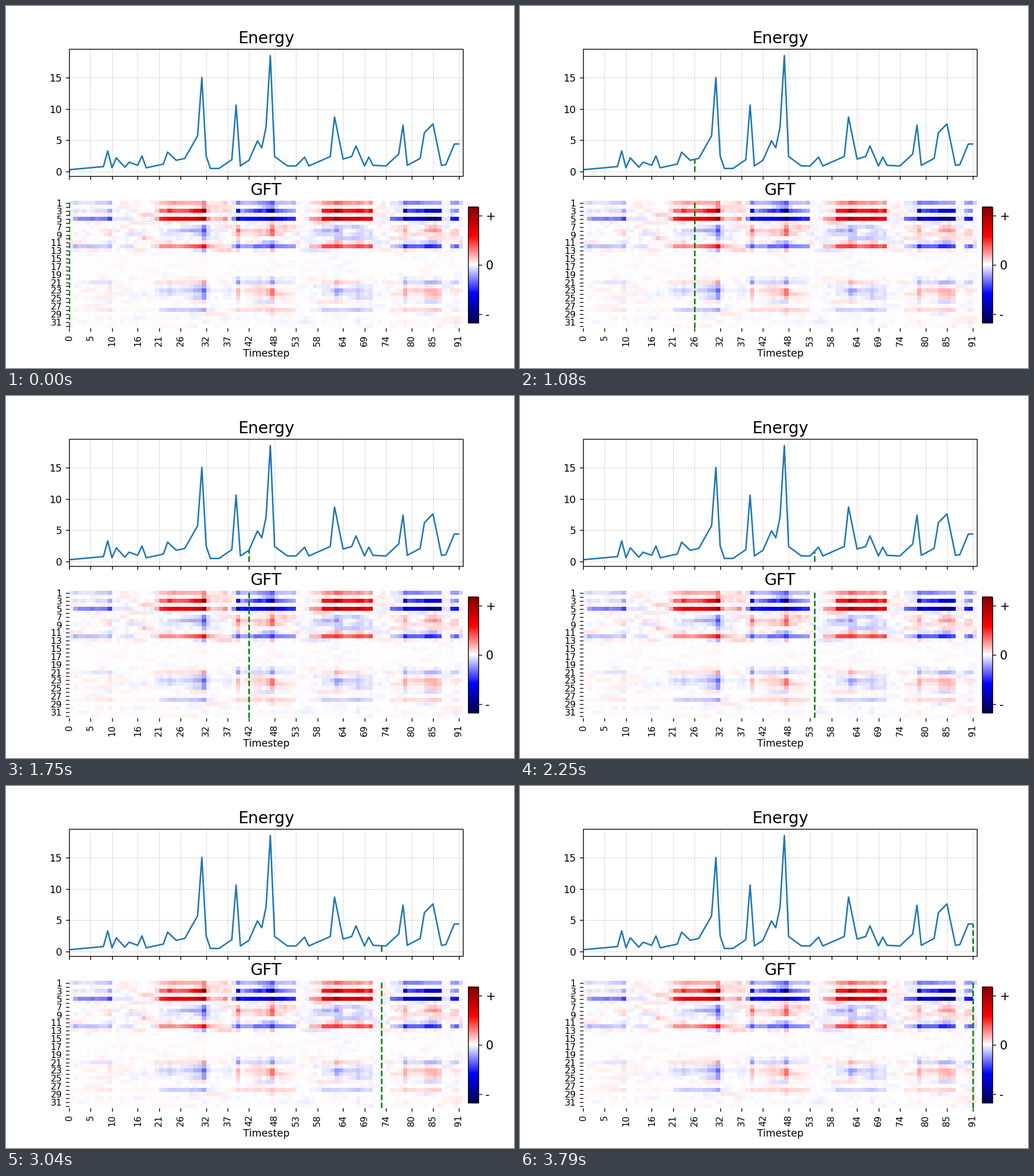
A matplotlib script for the animation above (3.83 s loop, 885x632 px).

```python
import numpy as np
import matplotlib.pyplot as plt
from matplotlib.animation import FuncAnimation
from matplotlib.patches import Rectangle

W, H, DPI = 885, 632, 128
K = 126.4 / DPI            # nominal points to figure points
PT = 126.4 / 72            # nominal points to pixels
ROWS, COLS = 32, 92
TICKS_PER_LOOP, TICK_MS = 383, 10
STEPS_PER_TICK = 0.24      # 24 steps per second

# Layout in pixels, y pointing down
LEFT, RIGHT = 110.1, 796.0
TOP1, BOTTOM1 = 75.4, 296.6
TOP2, BOTTOM2 = 340.8, 562.0
CB_LEFT, CB_RIGHT, CB_TOP, CB_BOTTOM = 805.3, 823.0, 350.7, 552.9
MID = (LEFT + RIGHT) / 2
TICK, PAD = 3.5 * PT, 7 * PT
THIN, THICK = 0.8 * K, 1.5 * K

# Turning points of the energy curve
KNOTS = [
    (0, .3), (8, .8), (9, 3.3), (10, .6), (11, 2.2), (13, .7), (14, 1.5), (16, 1),
    (17, 2.5), (18, .6), (22, 1.2), (23, 3.1), (25, 1.8), (27, 2.1), (30, 5.7),
    (31, 15), (32, 2.5), (33, .5), (35, .5), (38, 1.9), (39, 10.6), (40, .9),
    (42, 1.8), (44, 4.9), (45, 3.8), (46, 7.1), (47, 18.5), (48, 2.4), (51, .9),
    (53, .9), (55, 2.3), (56, .9), (61, 2.4), (62, 8.7), (64, 2), (66, 2.4),
    (67, 4.1), (69, .9), (70, 2.3), (71, 1), (74, .9), (77, 2.8), (78, 7.4),
    (79, 1), (82, 2.1), (83, 6.2), (85, 7.6), (87, 1), (88, 1.1), (90, 4.4),
    (91, 4.4)]
ENERGY = np.interp(np.arange(COLS), *zip(*KNOTS))

# Warm (+) and cold (-) phases: first step, last step, base strength
PHASES = [(1, 9, -.1), (20, 20, .1), (21, 31, .38), (32, 36, .06), (38, 38, -.05),
          (39, 52, -.3), (56, 58, .1), (59, 70, .42), (75, 77, -.06),
          (78, 86, -.42), (89, 90, -.15)]
# Share of the phase signal, and of its bursts, in single rows
PHASE_ROWS = {1: .3, 5: 1, 12: .48, 28: -.12}
BURST_ROWS = {2: .03, 7: -.05, 8: -.09, 9: -.05, 10: -.03, 11: .03, 13: -.03,
              20: .02, 21: .06, 22: -.03, 23: -.07, 24: -.06, 25: -.04, 26: .02}


def to_x(step):
    return LEFT + step * (RIGHT - LEFT) / COLS


def to_y(value):
    return 289.1 - 10.95 * value


def row_y(row):
    return TOP2 + (row - 0.5) * (BOTTOM2 - TOP2) / ROWS


def make_grid():
    # Faint streaks, stronger in the upper rows and at energy peaks
    rng = np.random.default_rng(4)
    noise = rng.normal(size=(ROWS, COLS))
    noise = sum(np.roll(noise, k, 1) for k in range(4)) / 2
    amp = np.repeat([0.045, 0.012, 0.028, 0.02], [13, 6, 6, 7])
    root = np.sqrt(ENERGY)
    grid = noise * amp[:, None] * (0.45 + 0.2 * root)

    phase = np.zeros(COLS)
    for first, last, base in PHASES:
        span = slice(first, last + 1)
        phase[span] = base + np.sign(base) * 0.14 * root[span]
    for row, share in PHASE_ROWS.items():
        grid[row - 1] += share * phase
    for row, share in BURST_ROWS.items():
        grid[row - 1] += share * phase * root
    grid[2] += 1.1 * phase * np.abs(phase)
    return np.clip(grid, -1, 1)


fig = plt.figure(figsize=(W / DPI, H / DPI), dpi=DPI, facecolor="white")
ax = fig.add_axes([0, 0, 1, 1])
plt.rcParams["font.family"] = "DejaVu Sans"


def picture(values, x0, x1, y0, y1):
    rgba = plt.get_cmap("seismic")((values + 1) / 2)
    ax.imshow(rgba, extent=(x0, x1, y1, y0), aspect="auto",
              interpolation="nearest", zorder=1)


def frame(x0, x1, y0, y1, lw=THIN, color="black"):
    return ax.add_patch(Rectangle((x0, y0), x1 - x0, y1 - y0, fill=False,
                                  lw=lw, ec=color, zorder=5))


def label(x, y, text, size, ha="center", va="baseline", **kw):
    ax.text(x, y, text, fontsize=size * K, ha=ha, va=va, **kw)


def v_ticks(xs, y):
    ax.vlines(xs, y, y + TICK, color="black", lw=THIN)


def h_ticks(ys, x0, x1):
    ax.hlines(ys, x0, x1, color="black", lw=THIN)


def clipped_line(xs, ys, clip, zorder, **kw):
    line, = ax.plot(xs, ys, lw=THICK, zorder=zorder, **kw)
    line.set_clip_path(clip)
    return line


x_marks = np.linspace(0, COLS - 1, 18).astype(int)
x_pos = to_x(x_marks)
y_marks = np.arange(0, 20, 5)
rows = np.arange(1, ROWS + 1)

# Energy chart
grid_style = dict(color="#b0b0b0", alpha=0.7, lw=0.5 * K, linestyles="--", zorder=1)
ax.vlines(x_pos, BOTTOM1, TOP1, **grid_style)
ax.hlines(to_y(y_marks), LEFT, RIGHT, **grid_style)
energy_box = frame(LEFT, RIGHT, TOP1, BOTTOM1)
v_ticks(x_pos, BOTTOM1)
h_ticks(to_y(y_marks), LEFT - TICK, LEFT)
for mark in y_marks:
    label(LEFT - PAD, to_y(mark), str(mark), 10, "right", "center_baseline")
label(MID, TOP1 - 6 * PT, "Energy", 16)
clipped_line(to_x(np.arange(COLS)), to_y(ENERGY), energy_box, 3, color="C0")

# Heat map
picture(make_grid(), LEFT, RIGHT, TOP2, BOTTOM2)
heat_box = frame(LEFT, RIGHT, TOP2, BOTTOM2, 0, "none")
v_ticks(x_pos, BOTTOM2)
h_ticks(row_y(rows), LEFT - TICK, LEFT)
for row in rows[::2]:
    label(LEFT - PAD, row_y(row), str(row), 9, "right", "center_baseline")
for mark, x in zip(x_marks, x_pos):
    label(x, BOTTOM2 + PAD, str(mark), 9, va="top", rotation=90)
label(MID, TOP2 - 6 * PT, "GFT", 16)
label(MID, 612.5, "Timestep", 10)

# Colour scale
picture(np.linspace(1, -1, 256)[:, None], CB_LEFT, CB_RIGHT, CB_TOP, CB_BOTTOM)
frame(CB_LEFT, CB_RIGHT, CB_TOP, CB_BOTTOM)
cb_mid = (CB_TOP + CB_BOTTOM) / 2
for text, offset in (("+", -86), ("0", 0), ("-", 86)):
    h_ticks([cb_mid + offset], CB_RIGHT, CB_RIGHT + TICK)
    label(CB_RIGHT + PAD, cb_mid + offset, text, 12, "left", "center_baseline")

# Moving markers
green = dict(color="green", linestyle="--")
stem = clipped_line([LEFT] * 2, [to_y(0)] * 2, energy_box, 4, **green)
cursor = clipped_line([LEFT] * 2, [BOTTOM2, TOP2], heat_box, 4, **green)

ax.set_xlim(0, W)
ax.set_ylim(H, 0)
ax.axis("off")


def update(tick):
    step = int((tick + 0.49) * STEPS_PER_TICK)
    x = to_x(step)
    stem.set_data([x, x], [to_y(0), to_y(ENERGY[step])])
    cursor.set_xdata([x, x])
    return stem, cursor


anim = FuncAnimation(fig, update, frames=TICKS_PER_LOOP, interval=TICK_MS,
                     repeat=True, repeat_delay=0, blit=False)
plt.show()
```
